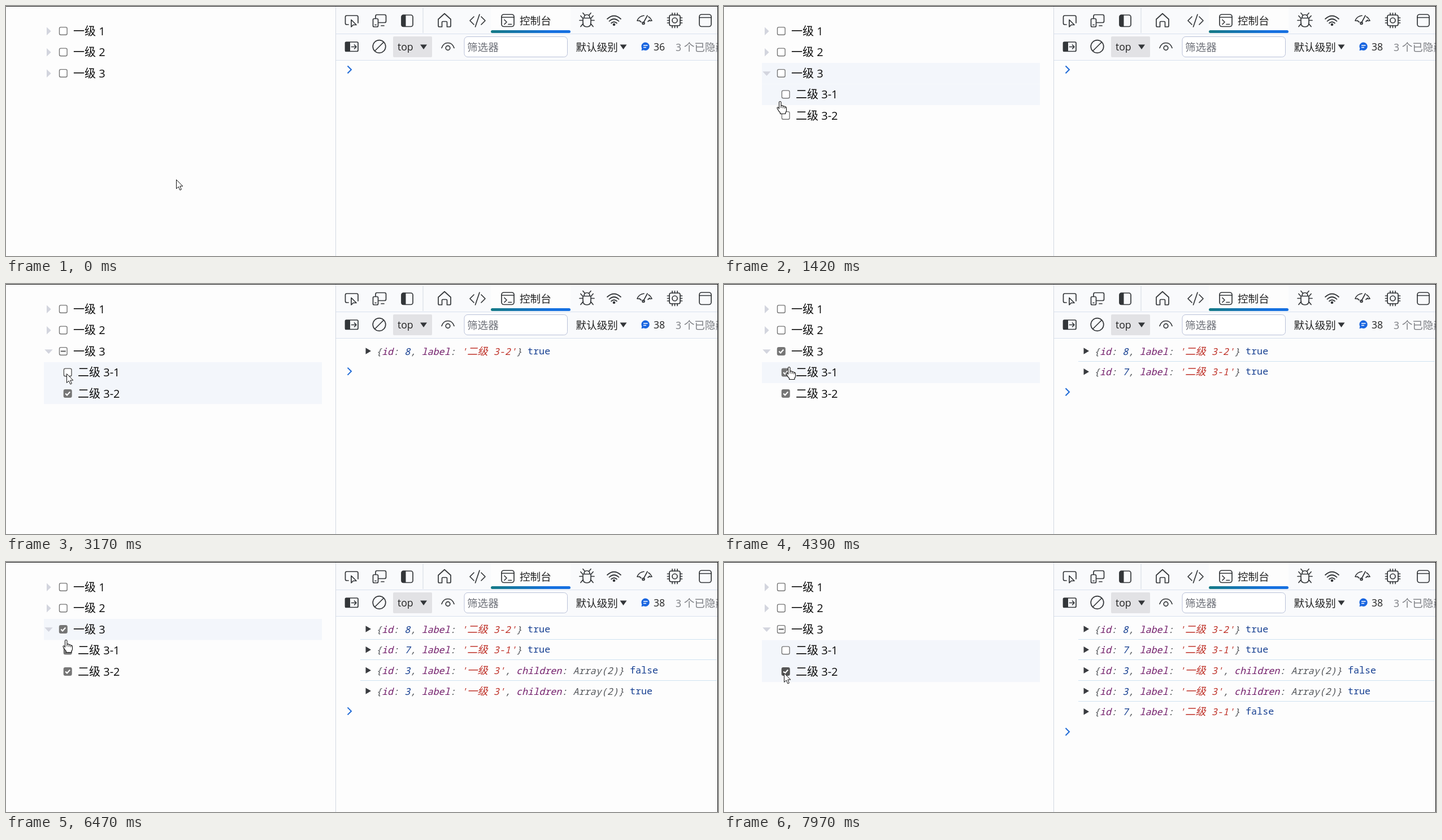
Animation of 1260x444 px, one loop 8 s. Source, as an HTML page:

```html
<!DOCTYPE html>
<html lang="zh">
<head>
<meta charset="utf-8">
<style>
html, body { margin: 0; height: 100%; overflow: hidden; background: #fdfdfd; }
svg { display: block; width: 1260px; height: 444px; font-family: "Open Sans", "Noto Sans CJK SC", "Noto Sans CJK", sans-serif; }
.tree text { font-size: 20px; fill: #0c0c0c; }
.ui { font-size: 18.6px; fill: #222; }
.ui .latin { font-size: 17.6px; }
.icon { fill: none; stroke: #333639; stroke-width: 1.7; stroke-linejoin: round; stroke-linecap: round; }
.solid { fill: #333639; stroke: none; }
.log { font: 16.75px "Noto Sans Mono", "Noto Sans CJK SC", "Noto Sans CJK", monospace; fill: #55585c; }
.obj { font-style: italic; }
.key { fill: #74206c; }
.val { fill: #163f91; }
.str { fill: #bf3229; }
.cjk { font-size: 18.4px; }
</style>
</head>
<body>
<svg viewBox="0 0 1260 444">
  <defs>
    <linearGradient id="accent">
      <stop offset="0" stop-color="#157a86"/>
      <stop offset=".75" stop-color="#1670e0"/>
    </linearGradient>
    <clipPath id="fold"><rect id="foldBox" x="60" y="138.5" width="510" height="0"/></clipPath>
  </defs>
  <rect width="1260" height="444" fill="#fdfdfd"/>

  <g class="tree">
    <g id="roots"></g>
    <g id="kids" clip-path="url(#fold)"></g>
  </g>

  <!-- panel chrome -->
  <rect x="584" y="1" width="676" height="95" fill="#f9fafc"/>
  <rect x="858" y="1" width="141" height="48" fill="#fdfdfd"/>
  <path d="M583.5 1V444M738 2V48" stroke="#d3d9e2"/>
  <path d="M584 49.5H1260M584 96.5H1260" stroke="#d9e1ef"/>
  <rect x="858" y="43" width="141" height="5" rx="2.5" fill="url(#accent)"/>
  <rect x="685" y="54" width="69" height="37" rx="2" fill="#e2e2e5"/>
  <rect x="811" y="54.5" width="182.5" height="36" rx="6" fill="#fff" stroke="#b9c1d8"/>

  <g class="icon">
    <path d="M606 33h-3q-2.500 0-2.500-2.500V19.500q0-2.500 2.500-2.500h17.500q2.500 0 2.500 2.500V30"/>
    <path d="M611 24.500V37l3.500-3.500h5.500z"/>
    <path d="M654 22V18q0-2.500 2.500-2.500H670q2.500 0 2.500 2.500V27q0 2.500-2.500 2.500H660M664 35h5M649.500 24.500q0-2 2-2h5q2 0 2 2V35q0 2-2 2h-5q-2 0-2-2zM653 33.500h2"/>
    <rect x="700" y="16" width="20" height="20.500" rx="3.500"/>
    <path class="solid" d="M699.500 19q0-3.500 3.500-3.500h4.500V37H703q-3.500 0-3.500-3.500z"/>
    <path d="M765 23.500L776 13.500l11 10V35q0 2-2 2h-4.500V29q0-1.500-1.500-1.500h-6q-1.500 0-1.500 1.500v8H767q-2 0-2-2z"/>
    <path d="M828 19l-7 7 7 7M841 19l7 7-7 7M838 15l-7.500 22"/>
    <rect x="877" y="15" width="22" height="21.500" rx="4"/>
    <path d="M877 20h22M882 24.500l4 4-4 4M889 32.500h5.500"/>
    <path d="M1021 21.500h14V30q0 7-7 7t-7-7zM1023 21q0-5.500 5-5.500t5 5.500M1024 16l-3-3.500M1032 16l3-3.500M1021 25.500h-6M1035 25.500h6M1021 22l-4-4.500M1035 22l4-4.500M1021.500 31l-4.500 5.500M1034.500 31l4.500 5.500"/>
    <path d="M1064 23q12-11 24 0M1067.500 27q8.500-8 17 0M1071 30.500q5-4.500 10 0"/>
    <circle class="solid" cx="1076" cy="33" r="2.300"/>
    <path d="M1117 26q3-8 12-9M1137 19q4 2.500 6 7M1128 30l7-13M1121 26l3 2.500M1139 25l-3 2.500M1117 26l4 .5M1143 26l-3.500 .5"/>
    <circle cx="1128" cy="30.500" r="2"/>
    <rect x="1174" y="16" width="19" height="19" rx="3"/>
    <circle cx="1183.500" cy="25.500" r="4.500"/>
    <path d="M1179 16v-3.500M1183.500 16v-3.500M1188 16v-3.500M1179 35v3.500M1183.500 35v3.500M1188 35v3.500M1174 21h-3.500M1174 25.500h-3.500M1174 30h-3.500M1193 21h3.500M1193 25.500h3.500M1193 30h3.500"/>
    <rect x="1227" y="15" width="21" height="21.500" rx="4"/>
    <path d="M1227 20.500h21"/>
    <rect x="600.500" y="64" width="22.500" height="16.500" rx="2"/>
    <path class="solid" d="M600 64h9v17h-9z"/>
    <path d="M611.500 72.500h8M616.500 69l3.500 3.500-3.500 3.500"/>
    <circle cx="660.500" cy="72" r="11.300"/>
    <path d="M668.500 64l-16 16"/>
    <path d="M771 74.500q3-9 11-9t11 9"/>
    <circle cx="782" cy="74.500" r="3.800"/>
    <path class="solid" d="M733 68.500h12l-6 8.500zM1086.500 68.500h12l-6 8.500z"/>
  </g>
  <path d="M1131.500 64.500a7.200 7.200 0 1 1-3 13.700l-4 1 .8-4a7.200 7.200 0 0 1 6.200-10.700z" fill="#1a66e0"/>
  <path d="M1128 70h7.500M1128 73.500h5" stroke="#fff" stroke-width="1.300"/>

  <g class="ui">
    <text x="909" y="33">控制台</text>
    <text class="latin" x="693" y="79">top</text>
    <text x="816" y="80" fill="#6d7078">筛选器</text>
    <text x="1008.500" y="79.500">默认级别</text>
    <text class="latin" id="count" x="1146" y="79">36</text>
    <text x="1185" y="79.500" fill="#7b7d82"><tspan class="latin">3 </tspan>个已隐藏</text>
  </g>

  <g id="logs"></g>
  <path id="prompt" d="M604.500-6.500l6.500 6.500-6.500 6.500" fill="none" stroke="#1f6ad6" stroke-width="2"/>
  <path d="M0 .5H1260M1259.500 0V444" stroke="#111"/>

  <path id="arrow" d="M.5.500V16.500l3.700-3.500 2.700 6 2.500-1.100-2.600-5.900h5z" fill="#fff" stroke="#111"/>
  <path id="hand" d="M-1.500 13.500V2q0-1.500 1.700-1.500T2 2v6q3.200-1 3.500 1 3-.8 3.300 1.200 2.700-.5 2.700 2v4q0 2.500-1.700 4.300v2H.5v-2q-2.500-2-5.200-7.500-.8-2 .8-2.300 1.200 0 2.400 2.800zM2 8v4M5.500 9v3.500M8.800 10.200v3" fill="#fff" stroke="#111" stroke-width="1.100"/>
</svg>
<script>
const LOOP = 8000, PITCH = 37.5, TOP = 26, OPEN_AT = 1060;
const $ = id => document.getElementById(id);
const set = (el, name, value) => el.setAttribute(name, value);
const show = (el, on) => set(el, 'visibility', on ? 'visible' : 'hidden');

// time, x, y of the pointer tip
const path = [
  [40, 301, 308], [770, 74, 125], [1200, 74, 125], [1640, 124, 212], [1830, 118, 196],
  [1870, 118, 197], [2120, 114, 200], [2600, 114, 200], [3170, 107, 159], [3380, 108, 156],
  [3910, 108, 156], [3990, 119, 162], [4350, 119, 162], [4390, 115, 147], [4520, 104, 120],
  [4800, 104, 120], [5290, 112, 126], [5490, 112, 126], [5610, 103, 119], [6400, 103, 119],
  [6470, 106, 138], [6590, 107, 157], [6850, 107, 157], [7320, 105, 160], [7690, 105, 160],
  [7970, 106, 197]
];

// press time, release time, row index, node id, new state
const clicks = [
  [2160, 2200, 4, 8, true], [3420, 3460, 3, 7, true], [4680, 4720, 2, 3, false],
  [5940, 5980, 2, 3, true], [6590, 6790, 3, 7, false]
];

const rows = ['一级 1', '一级 2', '一级 3', '二级 3-1', '二级 3-2'].map((label, i) => {
  const child = i > 2, y = TOP + PITCH * (i + .5), x = child ? 109.2 : 101.3;
  const g = $(child ? 'kids' : 'roots');
  g.insertAdjacentHTML('beforeend', `<g>
    <rect x="67" y="${y - PITCH / 2}" width="492" height="${PITCH}" fill="#f3f6fb"/>
    <path d="${child ? '' : 'M-3.5-7.2L4.2 0l-7.7 7.2z'}" transform="translate(75.5 ${y})" fill="#d3d5de"/>
    <g transform="translate(${x} ${y - .3})">
      <rect x="-6.8" y="-6.8" width="13.6" height="13.6" rx="2.5" stroke-width="1.4"/>
      <path d="M-4 0l2.800 3 5.200-6" fill="none" stroke="#fff" stroke-width="2.200"/>
      <path d="M-4.500 0h9" stroke="#666" stroke-width="2.200"/>
    </g>
    <text x="${child ? 127 : 119}" y="${y + 7}">${label}</text></g>`);
  const [back, caret, box] = g.lastElementChild.children;
  const [frame, tick, dash] = box.children;
  return { x, y, back, caret, frame, tick, dash };
});

const span = (kind, text) => `<tspan class="${kind}">${text}</tspan>`;
const logs = clicks.map(([, , row, id, on], i) => {
  const y = 119 + i * 36.7;
  const [name, num] = row === 2 ? ['一级', '3'] : ['二级', '3-' + (row - 2)];
  const more = row === 2 ? `, ${span('key', 'children')}: Array(2)` : '';
  $('logs').insertAdjacentHTML('beforeend', `<g class="log">
    ${i ? `<path d="M627 ${Math.round(y - 19) + .5}H1258" stroke="#cfe2f1"/>` : ''}
    <path d="M636.500 ${y - 5.700}l9.500 5.700-9.500 5.700z" fill="#393b3f"/>
    <text x="655" y="${y + 6.500}"><tspan class="obj">{${span('key', 'id')}: ${span('val', id)}, ${span('key', 'label')}: ${span('str', `'${span('cjk', name)} ${num}'`)}${more}}</tspan><tspan class="val" dx="10" dy="-1">${on}</tspan></text></g>`);
  return $('logs').lastElementChild;
});

const ease = p => p * p * (3 - 2 * p);

function pointer(t) {
  const i = path.findIndex(k => k[0] > t);
  if (i < 1) return (i ? path[path.length - 1] : path[0]).slice(1);
  const [a, b] = [path[i - 1], path[i]];
  const p = ease((t - a[0]) / (b[0] - a[0]));
  return [a[1] + (b[1] - a[1]) * p, a[2] + (b[2] - a[2]) * p];
}

function draw(now) {
  const t = now % LOOP;
  const [x, y] = pointer(t);
  const open = ease(Math.min(1, Math.max(0, (t - OPEN_AT) / 300)));
  const done = clicks.filter(c => c[1] <= t);
  const pressed = clicks.filter(c => c[0] <= t).pop();
  const focus = pressed ? pressed[2] : t >= OPEN_AT ? 2 : -1;

  const checked = [false, false, false, false, false];
  for (const [, , row, , on] of done) {
    if (row === 2) checked[3] = checked[4] = on;
    else checked[row] = on;
  }
  checked[2] = checked[3] && checked[4];

  const inTree = x >= 67 && x <= 559 && y >= TOP && y < TOP + PITCH * (3 + 2 * open);
  const hover = inTree ? Math.floor((y - TOP) / PITCH) : -1;
  let onBox = false;
  rows.forEach((r, i) => {
    const over = i === hover && Math.abs(x - r.x) < 7.5 && Math.abs(y - r.y) < 8.5;
    const ink = over ? '#555' : '#767676';
    onBox = onBox || over;
    show(r.back, i === hover || i === focus);
    set(r.frame, 'fill', checked[i] ? ink : '#fff');
    set(r.frame, 'stroke', ink);
    show(r.tick, checked[i]);
    show(r.dash, i === 2 && checked[3] !== checked[4]);
  });
  set(rows[2].caret, 'transform', `translate(75.5 ${rows[2].y}) rotate(${90 * open})`);
  set($('foldBox'), 'height', 2 * PITCH * open);

  logs.forEach((g, i) => show(g, i < done.length));
  const n = done.length;
  set($('prompt'), 'transform', `translate(0 ${n ? 118.5 + 36.6 * n : 113})`);
  $('count').textContent = t < 1140 ? 36 : 38;

  const hand = inTree && !onBox;
  show($('hand'), hand);
  show($('arrow'), !hand);
  set($(hand ? 'hand' : 'arrow'), 'transform', `translate(${Math.round(x)} ${Math.round(y)})`);
  requestAnimationFrame(draw);
}
draw(0);
</script>
</body>
</html>
```
